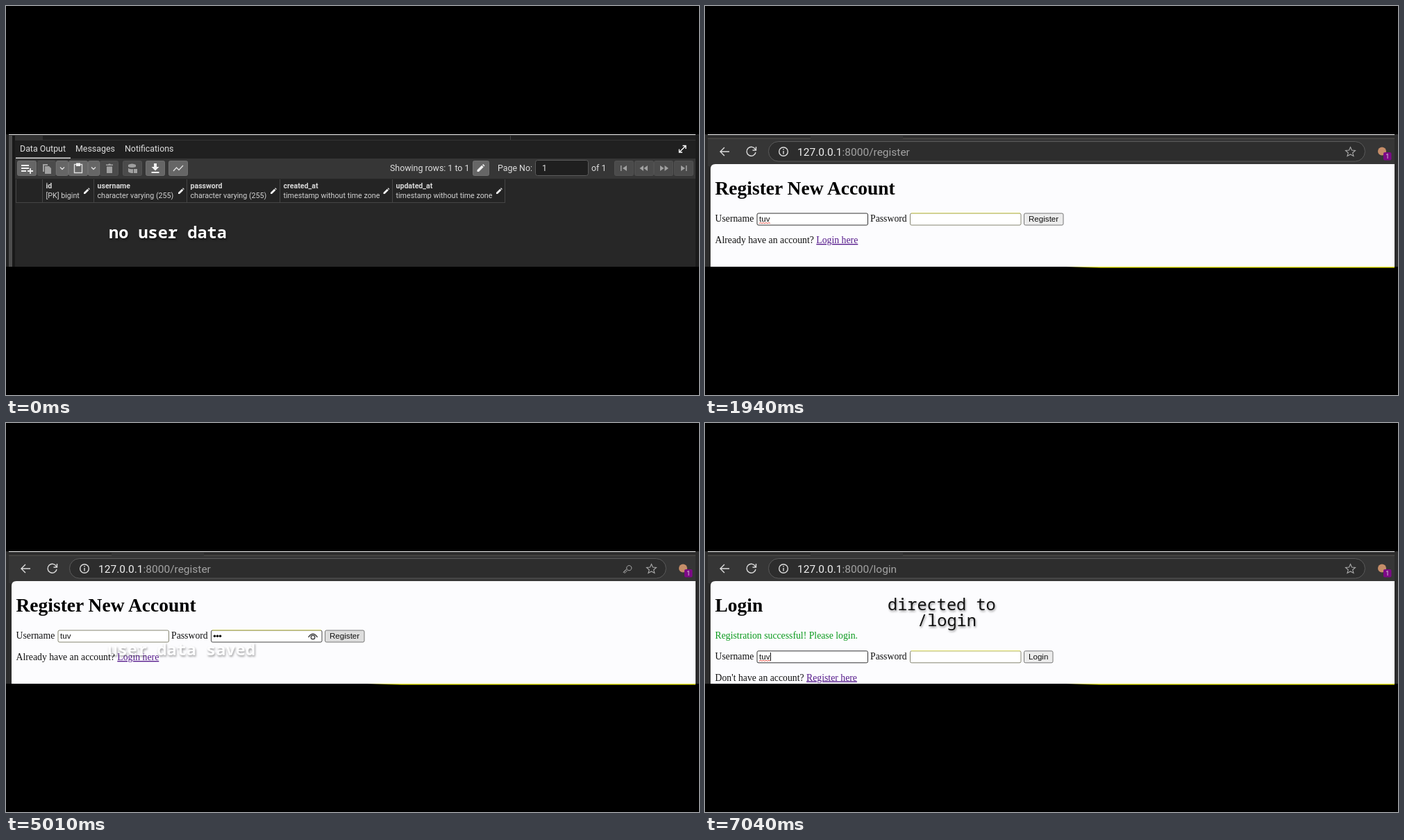
Write an HTML page that moves like this. It is 998 by 561 pixels and loops after 8 s.

```html
<!DOCTYPE html>
<html lang="en">
<head>
<meta charset="utf-8">
<title>Registration demo</title>
<style>
  html, body { margin: 0; width: 100%; height: 100%; overflow: hidden; background: #000; }
  svg { display: block; width: 998px; height: 561px; }
  text { white-space: pre; }
  .ui { font: 12.4px Roboto, sans-serif; fill: #dedede; }
  .cell { font: 10.7px Roboto, sans-serif; fill: #d2d2d2; }
  .name { font: bold 10.6px Roboto, sans-serif; fill: #d8d8d8; }
  .url { font: 15.5px Roboto, sans-serif; fill: #a3a3a3; }
  .body { font: 13.75px "Liberation Serif", serif; fill: #111; }
  .title { font: bold 27.5px "Liberation Serif", serif; fill: #000; }
  .field { font: 11.6px "Liberation Sans", sans-serif; fill: #111; }
  .link { fill: #551a8b; text-decoration: underline; }
  .caption { font: bold 23.6px "Noto Sans Mono", monospace; fill: #fff; filter: drop-shadow(1px 2px 1.5px #0009); }
  .note { font-weight: normal; fill: #111; filter: drop-shadow(1px 2px 1.5px #0006); }
  .line { fill: none; stroke: #ddd; stroke-width: 1.4; }
</style>
</head>
<body>
<svg id="stage" viewBox="0 0 998 561"></svg>
<script>
const USER = 'tuv';
const stage = document.getElementById('stage');

const rect = (x, y, w, h, fill, more = '') =>
  `<rect x="${x}" y="${y}" width="${w}" height="${h}" fill="${fill}" ${more}/>`;
const text = (x, y, cls, str, more = '') =>
  `<text x="${x}" y="${y}" class="${cls}" ${more}>${str}</text>`;
const line = (d, more = '') => `<path class="line" d="${d}" ${more}/>`;
const solid = (d, fill = '#f0f0f0') => `<path d="${d}" fill="${fill}"/>`;
const group = (id, content) => `<g id="${id}">${content}</g>`;
const pencil = (x, y, size) =>
  `<g transform="translate(${x} ${y}) scale(${size})">${solid('M-5 5V2.5L1.7-4.2 4.2-1.7-2.5 5ZM2.5-5 3.8-6 6-3.8 5-2.5Z')}</g>`;

function database() {
  const dim = '#a0a0a0';
  const button = ([x, w, off]) =>
    rect(x + .5, 223.5, w, 21, off ? '#4b4b4b' : '#666', `rx="2" stroke="${off ? '#525252' : '#707070'}"`);
  const buttons = [[16, 27], [45, 26, 1], [72, 17], [90, 27], [118, 16], [135, 26, 1], [168, 27, 1],
    [201, 27], [234, 27], [672, 23], [876, 27, 1], [905, 27, 1], [933, 27, 1], [962, 27, 1]];
  const icons =
    line('M22 230H33M22 234H33M22 238H29M31 238H39M35 234V242', 'style="stroke:#f0f0f0;stroke-width:1.8"') +
    solid('M53 228H60V230H55V239H53ZM56 231H62L65 234V242H56Z', dim) +
    line('M78 232.5 81 235.5 84 232.5M123 232.5 126 235.5 129 232.5') +
    line('M98.500 228.500H109.500V240.500H98.500Z') + solid('M101 226.500H107V231H101Z') +
    solid('M144 230H154V228.500H151L150 227.500H148L147 228.500H144ZM145 231.500H153V241H145Z', dim) +
    solid('M176 229Q181.500 226 187 229V232Q181.500 234 176 232ZM176 234Q180 236 183 235V241Q178 241 176 239ZM184 235H189V241H184Z', dim) +
    solid('M213 227H217V232H220.500L215 237.500 209.500 232H213ZM209.500 239H220.500V241H209.500Z') +
    line('M241 238 245.500 233 249 236.500 255 230') +
    pencil(683.5, 234, 1) +
    solid('M885 230H886.500V238H885ZM894 230V238L888 234ZM918 230V238L912.500 234ZM924 230V238L918.500 234Z', dim) +
    solid('M942 230V238L947.500 234ZM948.500 230V238L954 234ZM972 230V238L978 234ZM979 230H980.500V238H979Z', dim) +
    line('M970 210.500 978.500 202M974.500 201.500H979V206M969.500 206.500V211H974', 'style="stroke:#fff"');
  const columns = [
    [52, 'id', '[PK] bigint', 116], [126, 'username', 'character varying (255)', 252],
    [260, 'password', 'character varying (255)', 385],
    [394, 'created_at', 'timestamp without time zone', 547.5],
    [556, 'updated_at', 'timestamp without time zone', 710]];
  const header = rect(14, 250, 704, 33, '#242424') + columns.map(([x, name, type, edit]) =>
    text(x + 5.5, 263, 'name', name) + text(x + 5.5, 277, 'cell', type) + pencil(edit, 267, .8)).join('');
  const grid = (top, bottom) =>
    line([14, ...columns.map(c => c[0]), 718].map(x => `M${x}.5 ${top}V${bottom}`).join('') +
      `M14 ${bottom}.5H719`, 'style="stroke:#454545;stroke-width:1"');
  const stamp = '2025-10-15 02:52:15';
  const row = rect(14, 284, 704, 21, '#2c2c2c') + rect(14, 284, 38, 21, '#242424') + grid(284, 304) +
    [[20, 1], [112, 2], [133, USER], [267, 123], [401, stamp], [563, stamp]]
      .map(([x, str]) => text(x, 298, 'cell', str)).join('');

  return rect(0, 185, 998, 191, '#202020') + rect(4, 187, 5, 189, '#4c4c4c') + rect(9, 187, 4, 189, '#191919') +
    rect(13, 187, 40, 6, '#333') + rect(726, 187, 1, 6, '#444') + rect(13, 193, 980, 1, '#343434') +
    rect(13, 220, 980, 29, '#363636') + rect(13, 249, 980, 127, '#272727') +
    rect(993, 187, 5, 189, '#1b1b1b') + rect(4, 185, 989, 1, '#f4f4f4') +
    text(20, 210, 'ui', 'Data Output') + text(100, 210, 'ui', 'Messages') + text(171, 210, 'ui', 'Notifications') +
    rect(14, 218.5, 79, 1.5, '#ddd') + buttons.map(button).join('') + icons +
    text(553, 238, 'ui', 'Showing rows: 1 to 1') + text(708, 238, 'ui', 'Page No:') +
    rect(762.5, 222.5, 76, 22, '#1f1f1f', 'rx="3" stroke="#5a5a5a"') +
    text(772, 238, 'ui', '1') + text(843, 238, 'ui', 'of 1') +
    header + grid(250, 283) + group('row', row);
}

function browser() {
  return rect(0, 185, 998, 191, '#2c2c2c') + rect(4, 191, 989, 40, '#363636') +
    rect(152, 187, 133, 5, '#363636') + rect(4, 190.5, 148, 1, '#55534e') + rect(285, 190.5, 708, 1, '#55534e') +
    rect(4, 185, 989, 1, '#f4f4f4') +
    rect(91.5, 195.5, 859, 28.5, '#2d2d2d', 'rx="14.2" stroke="#5b5b5b"') +
    line('M35 210H22M28 204 22 210 28 216') +
    line('M72.500 207A6.500 6.500 0 1 0 73 211M73.500 203V208H68.500') +
    '<circle class="line" cx="113" cy="210" r="6.300"/>' + line('M113 209V213.500M113 206V207.500') +
    text(133, 215.5, 'url', '<tspan fill="#f0f0f0">127.0.0.1</tspan>:8000/<tspan id="path"></tspan>') +
    group('key', line('M893 211.500 889 215.500M894 210.500 889.500 215 891 216.500 895 212.500M894 210.500A3.600 3.600 0 1 1 896 212.500Z',
      'style="stroke:#aaa;stroke-width:1"')) +
    line('M929.500 203.500 931.500 208 936.500 208.500 932.700 211.800 934 216.500 929.500 214 925 216.500 926.300 211.800 922.500 208.500 927.500 208Z',
      'style="stroke:#aaa;stroke-width:1.1"') +
    '<circle cx="975" cy="209.500" r="6" fill="#c58d68"/>' + rect(977, 211, 11.5, 11.5, '#7d0a87', 'rx="2"') +
    text(980.3, 220.2, 'ui', '1', 'style="font-size:9px"') +
    '<path d="M8 376V235Q8 228 15 228H993V376Z" fill="#fcfcfe"/>' +
    group('register', text(14.5, 272, 'title', 'Register New Account') + form(0, 'Register', 57) +
      footer(342, 'Already have an account? ', 'Login here')) +
    group('login', text(14.5, 272, 'title', 'Login') +
      text(14.5, 310.5, 'body', 'Registration successful! Please login.', 'style="fill:#0a9a1c"') +
      form(29.8, 'Login', 42) + rect(94, 331, 1, 12, '#111') +
      footer(371.5, "Don't have an account? ", 'Register here')) +
    '<path d="M520 376.500 570 376H993V377.500H570Z" fill="#e4e41c"/>';
}

const footer = (y, question, link) =>
  text(14.5, y, 'body', `${question}<tspan class="link">${link}</tspan>`);

function form(dy, label, width) {
  const box = (x, cls) => rect(x, 299, 159.5, 17, '#fff', `rx="2" class="${cls}" stroke="#858570"`);
  return `<g transform="translate(0 ${dy})">` +
    text(14.5, 311, 'body', 'Username') + box(75, 'user') +
    text(78, 311, 'field', USER) +
    line('M78 313.500l2-1 2 1 2-1 2 1 2-1 2 1 2-1 2 1', 'data-spell="" style="stroke:#e2574c;stroke-width:1"') +
    text(238, 311, 'body', 'Password') + box(295.5, 'pass') + rect(297, 298.3, 157, 1, '#e3e36a') +
    rect(459.5, 299, width - .5, 17, '#ececec', 'class="send" rx="2" stroke="#777"') +
    text(466, 311.2, 'field', label) + '</g>';
}

const typed = [300.5, 304.5, 308.5].map(x => `<circle cx="${x}" cy="307.300" r="1.800" fill="#111"/>`).join('') +
  line('M435.500 309Q442 299.500 448.500 309', 'style="stroke:#444"') +
  '<circle class="line" cx="442" cy="309" r="2.800" style="stroke:#444"/>';

stage.innerHTML = rect(0, 0, 998, 561, '#000') + group('database', database()) + group('browser', browser()) +
  group('typed', typed) +
  text(148, 335, 'caption', 'no user data', 'id="empty"') +
  text(146.5, 335, 'caption', 'user data saved', 'id="saved"') +
  group('directed', text(263, 270, 'caption note', 'directed to') + text(306, 293, 'caption note', '/login'));

const $ = id => document.getElementById(id);
const show = (id, on) => { $(id).style.display = on ? '' : 'none'; };
const fade = (t, start, end) => Math.max(0, Math.min(1, (t - start) / (end - start)));
const registerForm = $('register');
const [userBox, passBox, sendButton, spelling] =
  ['.user', '.pass', '.send', '[data-spell]'].map(s => registerForm.querySelector(s));
$('login').querySelector('.user').setAttribute('stroke', '#333');

function draw(t) {
  const onLogin = t >= 6910;
  const onRegister = t >= 1370 && t < 5040;
  const hasPassword = onRegister && t >= 3200;
  show('database', !onRegister && !onLogin);
  show('row', t >= 5040);
  show('browser', onRegister || onLogin);
  show('register', onRegister);
  show('login', onLogin);
  show('key', hasPassword);
  show('typed', hasPassword);
  show('empty', t < 1370);
  $('path').textContent = onLogin ? 'login' : 'register';
  userBox.setAttribute('stroke', hasPassword ? '#858570' : '#333');
  passBox.setAttribute('stroke', hasPassword ? '#444' : '#858570');
  spelling.style.display = hasPassword ? 'none' : '';
  sendButton.setAttribute('fill', t >= 4370 ? '#dedede' : '#ececec');
  $('saved').style.opacity = t < 6840 ? fade(t, 4920, 5070) : 0;
  $('directed').style.opacity = fade(t, 6900, 7010);
}

function tick() {
  draw(performance.now() % 8000);
  requestAnimationFrame(tick);
}
tick();
</script>
</body>
</html>
```
